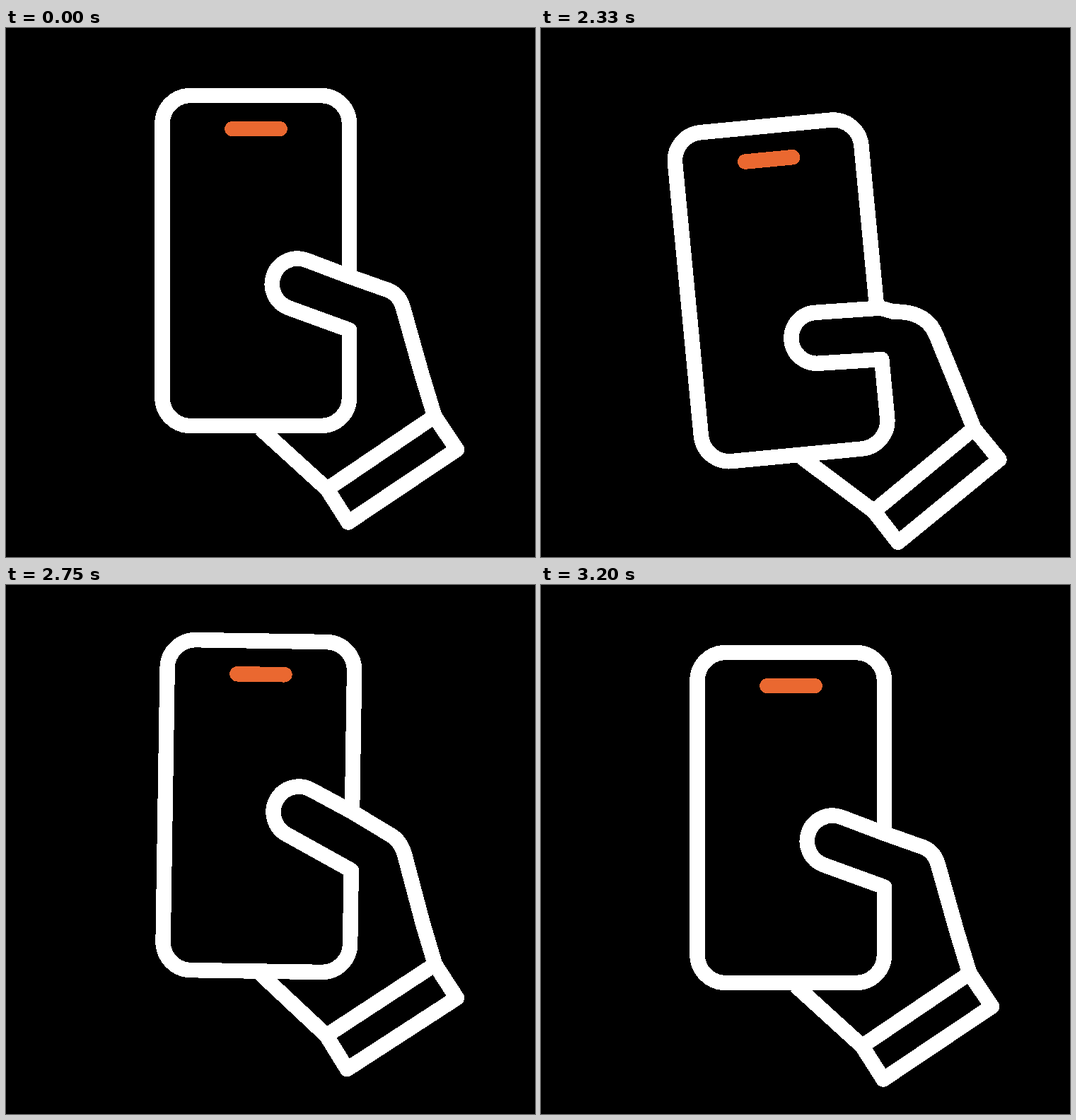
Write an HTML page that moves like this. It is 748x748 px and loops after 3.23 s.

```html
<!DOCTYPE html>
<html lang="en">
<head>
<meta charset="utf-8">
<title>Hand holding a phone</title>
<style>
  html, body { margin: 0; width: 100%; height: 100%; overflow: hidden; background: #000; }
  svg { display: block; width: 100vw; height: 100vh; shape-rendering: crispEdges; }
  path { fill: none; stroke: #fff; stroke-width: 21.5; stroke-linejoin: round; }
  #speaker { stroke: #ea6830; stroke-linecap: round; }
</style>
</head>
<body>
<svg viewBox="0 0 748 748">
  <g id="hand">
    <path id="outline"/>
    <path d="M360 566.5L454 652"/>
    <path d="M606 549L637.5 596L484 699L454 652Z"/>
    <path id="speaker" d="M320 142.7H387"/>
  </g>
</svg>
<script>
const LOOP = 3230, START = 2030, STEP = 30;
const CX = 353.25, CY = 329;
const THUMB = 72;

const hand = document.getElementById('hand');
const outline = document.getElementById('outline');

const ease = p => (1 - Math.cos(Math.PI * Math.min(1, Math.max(0, p)))) / 2;

// rises from 0 to 1 between a and b, falls back by c
const bump = (t, a, b, c) => ease((t - a) / (b - a)) - ease((t - b) / (c - b));

function outlinePath(low, high) {
  // the palm corner slides along the phone while the thumb turns about it
  const palmY = 427 + 17.5 * low - 18 * high;
  const angle = (20 - 24 * low + 16 * high) * Math.PI / 180;
  const reach = 91 - 6 * low + 27 * high;
  const cos = Math.cos(angle), sin = Math.sin(angle);
  const under = [485.5 - reach * cos, palmY - reach * sin];
  const top = [under[0] + THUMB * sin, under[1] - THUMB * cos];

  const edge = [486 + 6 * low, 351.5 + 23.5 * low - 31.5 * high];
  const knuckle = [541 - 39 * low + 4 * high, 371 + 4 * low - 4.5 * high];
  const back = [561 + 5.5 * low, 394 + 22 * low + 4 * high];
  const wrist = [588 + 2 * low, 490 + 3 * low + 4 * high];

  return `M485.5 ${edge[1]}V135.5a40 40 0 0 0 -40 -40H261a40 40 0 0 0 -40 40` +
    `V522.5a40 40 0 0 0 40 40H445.5a40 40 0 0 0 40 -40V${palmY}L${under}` +
    `A${THUMB / 2} ${THUMB / 2} 0 0 1 ${top}L${edge}L${knuckle}` +
    `Q555.5 377 ${back}L${wrist}L606 549`;
}

function draw(time) {
  let t = time % LOOP;
  t = t < START ? 0 : START + Math.floor((t - START) / STEP) * STEP;

  const low = bump(t, 2000, 2240, 2600);
  const high = bump(t, 2240, 2600, 2890);
  const settle = bump(t, 2600, 2890, 3200);

  const x = CX - 18.3 * low + 13.7 * high - 4.5 * settle;
  const y = CY + 57.8 * low - 47.7 * high + 11.6 * settle;
  const tilt = -6.9 * low + 3 * high - settle;
  hand.setAttribute('transform', `translate(${x} ${y}) rotate(${tilt}) translate(${-CX} ${-CY})`);
  outline.setAttribute('d', outlinePath(low, high + 0.07 * settle));
}

const t0 = performance.now();
function tick() {
  draw(performance.now() - t0);
  requestAnimationFrame(tick);
}
tick();
</script>
</body>
</html>
```
